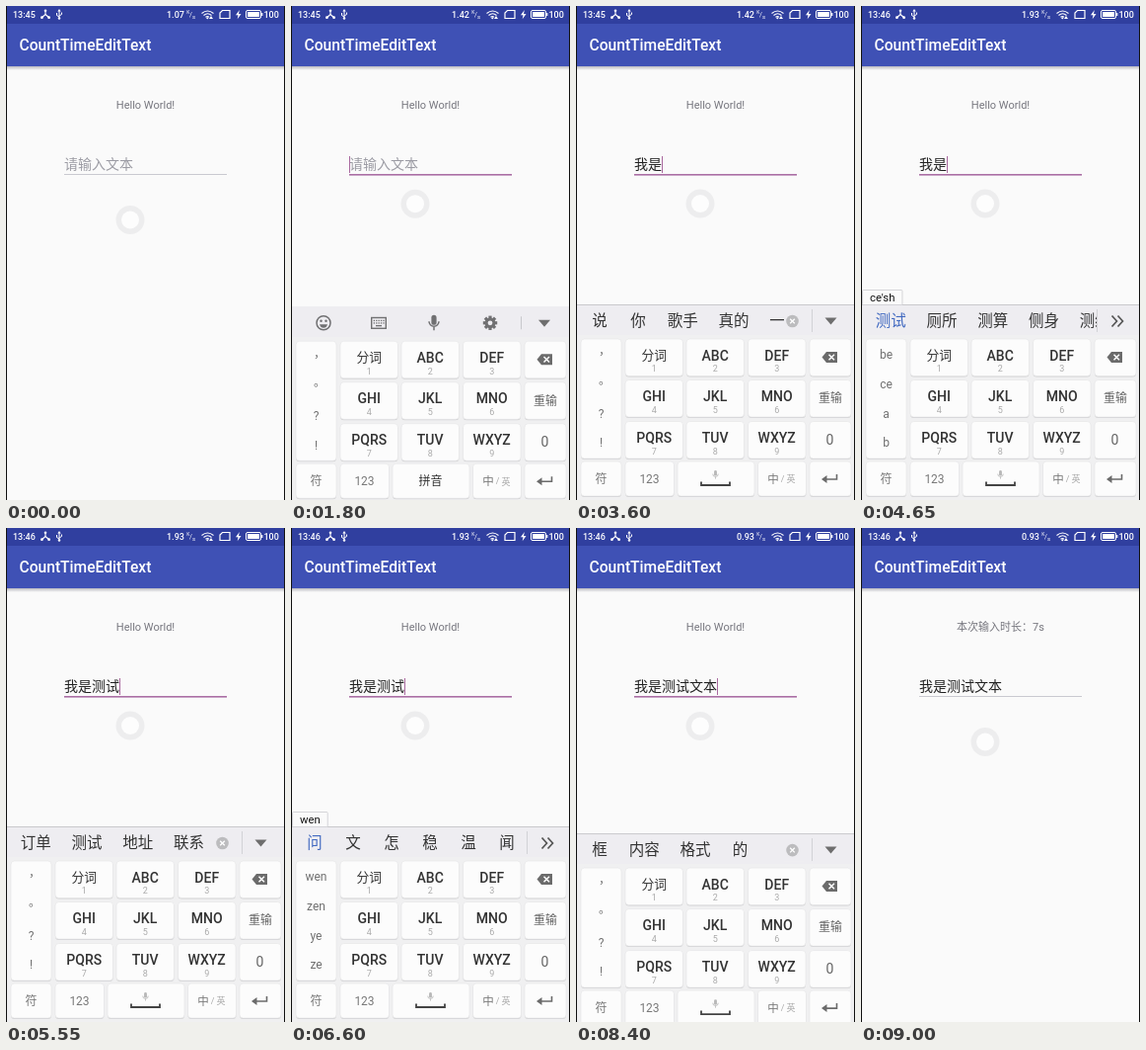
An HTML page that plays this animation: 283x500 px, repeating every 9450 ms.

```html
<!DOCTYPE html>
<html lang="zh-CN">
<head>
<meta charset="utf-8">
<title>CountTimeEditText</title>
<style>
html, body { margin: 0; width: 100%; height: 100%; overflow: hidden; background: #fafafa; }
svg { display: block; width: 283px; height: 500px; font-family: Roboto, "Noto Sans CJK SC", sans-serif; }
text { white-space: pre; }
</style>
</head>
<body>
<svg id="stage" viewBox="0 0 283 500"></svg>
<script>
const LOOP = 9450, STEP = 150, KB_HEIGHT = 198;
const $ = id => document.getElementById(id);

// Text placed by its vertical centre
const txt = (s, x, cy, size, fill, anchor = 'middle', weight = 400, id = '') =>
  `<text ${id && `id="${id}"`} x="${x}" y="${cy + size * .36}" font-size="${size}" fill="${fill}" text-anchor="${anchor}" font-weight="${weight}">${s}</text>`;
const rect = (x, y, w, h, fill, extra = '') =>
  `<rect x="${x}" y="${y}" width="${w}" height="${h}" fill="${fill}" ${extra}/>`;
const line = (d, color, width = 1, extra = '') =>
  `<path d="${d}" fill="none" stroke="${color}" stroke-width="${width}" ${extra}/>`;
const shape = (d, fill) => `<path d="${d}" fill="${fill}"/>`;
const dot = (x, y, r, fill) => `<circle cx="${x}" cy="${y}" r="${r}" fill="${fill}"/>`;
const key = (x, y, w, h) =>
  rect(x, y + 1, w, h, '#d3d3d5', 'rx="3.5"') + rect(x, y, w, h, '#fcfcfc', 'rx="3.5" stroke="#e4e4e6" stroke-width=".6"');
const mic = (x, y, k, fill) => `<g transform="translate(${x} ${y}) scale(${k})">` +
  rect(-2.6, -8, 5.2, 10, fill, 'rx="2.6"') + line('M-5-1.500a5 5 0 0 0 10 0M0 3.500V7.500', fill, 1.5) + '</g>';
const triangle = x => shape(`M${x - 6} 315.500h12l-6 7z`, '#6e6e6e');

function statusBar() {
  const w = '#fff';
  return rect(0, 0, 283, 18, '#303f9f') +
    txt('13:45', 7, 8.7, 9, w, 'start', 500, 'clock') +
    line('M40 4V8.500L36 12M40 8.500L44 12', w, 1.1) + dot(40, 4.8, 1.3, w) + dot(36.4, 11.7, 1.4, w) + dot(43.600, 11.7, 1.4, w) +
    line('M54 4V13M51.500 7V9.500L54 11M56.500 6.500V8.500L54 10', w) + shape('M52.300 5.500L54 3L55.700 5.500z', w) + dot(54, 12.5, 1.2, w) +
    txt('1.07', 163, 8.7, 9, w, 'start', 500, 'speed') +
    txt('K', 184.7, 6.4, 5, w) + txt('/', 187.5, 8.5, 7, w) + txt('s', 190.6, 10.5, 6, w) +
    line('M198.500 7.500Q204.500 2.500 210.500 7.500M200.500 9.500Q204.500 6 208.500 9.500M202.500 11.300Q204.500 9.700 206 11.300', w, 1.1) +
    dot(204.300, 12.2, 1, w) + shape('M208 10l2 3h-4z', w) +
    line('M219.500 4.500H227V12.500H217V7z', w, 1.2) +
    shape('M236.800 4L233 9.300H235.500L234.700 13.300L238.500 8H236z', w) +
    rect(243.500, 4.5, 15, 8, 'none', 'rx="1.5" stroke="#fff"') + rect(245, 6, 12, 5, w) + rect(259.200, 7, 1.2, 3, w) +
    txt('100', 261.5, 8.7, 9, w, 'start', 500);
}

function page() {
  return rect(0, 0, 283, 500, '#fafafa') + rect(0, 61, 283, 4, 'url(#shade)') +
    rect(0, 18, 283, 43, '#3f51b5') +
    txt('CountTimeEditText', 13.5, 39.7, 15.6, '#fff', 'start', 500) +
    statusBar() +
    txt('', 141.5, 100, 11, '#76767e', 'middle', 400, 'label') +
    txt('', 59, 160, 14, '#222', 'start', 400, 'input') +
    rect(59, 170, 165, 1, '#c9c9d0', 'id="underline"') +
    rect(59, 152, 1, 17, '#a9699f', 'id="caret"') +
    `<g id="ring">${dot(0, 0, 14.5, '#ededee')}${dot(0, 0, 9, '#fdfdfd')}</g>`;
}

function toolIcons() {
  const c = '#707072', teeth = [0, 45, 90, 135].map(a =>
    rect(-1.6, -7.2, 3.2, 14.4, c, `transform="rotate(${a})"`)).join('');
  const dots = [0, 1, 2, 3, 4].map(i => rect(83.700 + i * 2.4, 315.5, 1.3, 1.3, c) + rect(83.700 + i * 2.4, 318, 1.3, 1.3, c)).join('');
  return `<g id="tools">` +
    `<circle cx="33" cy="318.500" r="7" fill="none" stroke="${c}" stroke-width="1.500"/>` +
    dot(30.500, 316.5, 1.2, c) + dot(35.500, 316.5, 1.2, c) + shape('M29 320H37Q36 323.500 33 323.500T29 320z', c) +
    rect(81.700, 313.2, 14.6, 10.8, 'none', `stroke="${c}" stroke-width="1.400"`) + dots + rect(86, 320.7, 6, 1.3, c) +
    mic(145, 318.5, 1, c) +
    `<g transform="translate(202 318.500)">${teeth}${dot(0, 0, 5.4, c)}${dot(0, 0, 2.4, '#eeedf1')}</g>` +
    line('M233.500 312V325', '#c8c8cc') + triangle(257) + '</g>';
}

function keyboard() {
  const cols = [50, 112, 174.5], rows = [337, 378.5, 420.5], grey = '#777';
  const names = ['分词', 'ABC', 'DEF', 'GHI', 'JKL', 'MNO', 'PQRS', 'TUV', 'WXYZ'];
  let s = rect(0, 302, 283, 198, '#f0f0f1') + rect(0, 302, 283, 31, '#eeedf1') +
    key(5, 337, 41, 121) + '<g id="side"></g>';
  names.forEach((n, i) => {
    const x = cols[i % 3], y = rows[i / 3 | 0];
    s += key(x, y, 58.5, 37.5) +
      txt(n, x + 29.2, y + 16.5, i ? 14 : 12.8, '#333', 'middle', 500) +
      txt(i + 1, x + 29.2, y + 30, 9, '#aaa');
  });
  rows.forEach(y => s += key(237, y, 42, 37.5));
  [[5, 41], [50, 49.5], [103, 78], [184.5, 49], [237, 42]].forEach(([x, w]) => s += key(x, 461, w, 35));
  return s +
    shape('M249.500 355.500L254 350H265V361H254z', '#6b6b6b') + line('M256.500 352.700l5.500 5.500m0-5.500l-5.500 5.500', '#fff', 1.5) +
    txt('重输', 258, 397, 12, '#666') + txt('0', 257.5, 438.5, 14, '#666') +
    line('M264.500 474V479H251.500', '#6b6b6b', 1.6) + shape('M249 479L254.500 475V483z', '#6b6b6b') +
    txt('符', 25.5, 478.5, 12, grey) + txt('123', 74.5, 478.5, 12, grey) +
    txt('中', 200, 478.5, 11.5, grey) + txt('/', 209.5, 478.5, 9, '#aaa') + txt('英', 218, 479, 9, '#aaa') +
    txt('拼音', 141.5, 478.5, 12, '#333', 'middle', 500, 'spaceName') +
    `<g id="spaceIcon">${mic(141.500, 474.5, .55, '#b8b8b8')}${line('M127 481.500V485H156V481.500', '#444', 1.8)}</g>` +
    toolIcons() +
    `<g id="bar">${rect(0, 302, 283, 1, '#c9c9cc')}<g id="cands" clip-path="url(#strip)"></g>${line('M239.500 307V330', '#d2d2d6')}</g>` +
    `<g id="more">${line('M254.500 313.500l5 5.500l-5 5.500M260.500 313.500l5 5.500l-5 5.500', '#555', 1.7)}</g>` +
    `<g id="predict">${rect(211, 308, 20, 22, '#eeedf1')}${dot(219.500, 319, 6.3, '#bcbcbe')}${line('M217.200 316.700l4.600 4.600m0-4.600l-4.600 4.600', '#fff', 1.3)}${triangle(258.500)}</g>` +
    `<g id="popup">${rect(1.500, 287.5, 30, 15, '#fafafa', 'id="popupBox" rx="1" stroke="#d4d4d8"')}${txt('', 9, 295, 11.3, '#111', 'start', 400, 'pinyin')}</g>`;
}

$('stage').innerHTML = `<defs>
  <linearGradient id="shade" x2="0" y2="1"><stop stop-color="#b9b9c0"/><stop offset="1" stop-color="#fafafa"/></linearGradient>
  <clipPath id="strip"><rect x="0" y="303" width="239" height="30"/></clipPath></defs>` +
  page() + `<g id="kb">${keyboard()}</g>` + rect(0, 0, 1, 500, '#111') + rect(282, 0, 1, 500, '#111');

// [start, committed text, pinyin being typed, candidates, side column]
const marks = '， 。 ? !';
const states = [
  [0, '', '', '', marks],
  [2250, '', 'w', '我 在 这 中 要 找', 'w x y z'],
  [2400, '', 'wo', '我 有 走 握 窝 又', 'wo yo w x'],
  [2700, '', "wo's", '我是 我去 我说 我怕 我让', 'wo yo w x'],
  [2850, '', "wo'sh", '我是 我说 我去 我上 我让', 'wo yo w x'],
  [3000, '', "wo'shi", '我是 我市 我试 卧室 我使', 'wo yo w x'],
  [3450, '我是', '', '说 你 歌手 真的 一个', marks],
  [4050, '我是', 'c', '不 吧 才 从 把 次', 'a b c 2'],
  [4200, '我是', 'ce', '测 策 册 侧 厕 被', 'be ce a b'],
  [4500, '我是', "ce's", '测试 策略 厕所 测算 侧身', 'be ce a b'],
  [4650, '我是', "ce'sh", '测试 厕所 测算 侧身 测绘', 'be ce a b'],
  [4800, '我是', "ce'shi", '测试 侧室 策士 测时 侧视', 'be ce a b'],
  [5400, '我是测试', '', '订单 测试 地址 联系', marks],
  [6000, '我是测试', 'w', '我 在 这 中 要 找', 'w x y z'],
  [6150, '我是测试', 'ye', '也 页 夜 业 野 叶', 'ye ze w x'],
  [6450, '我是测试', 'wen', '问 文 怎 稳 温 闻', 'wen zen ye ze'],
  [6900, '我是测试', "wen'b", '文本 问 文 怎 稳 温', 'wen zen ye ze'],
  [7050, '我是测试', "wen'be", '文本 问 文 怎 稳 温', 'wen zen ye ze'],
  [7200, '我是测试', "wen'ben", '文本 问 文 怎 稳 温', 'wen zen ye ze'],
  [7950, '我是测试文本', '', '框 内容 格式 的', marks]
];

const show = (id, on) => $(id).setAttribute('visibility', on ? 'visible' : 'hidden');
const set = (id, attrs) => { for (const k in attrs) $(id).setAttribute(k, attrs[k]); };
const clamp = v => Math.max(0, Math.min(1, v));
const latest = (list, t) => list.filter(([at]) => at <= t).pop();

function candidates(list, typing) {
  let x = 4.5;
  return list.split(' ').map((c, i) => {
    const w = c.length > 1 ? 51.7 : 39;
    x += w;
    return txt(c, x - w / 2, 318.7, 15.5, typing && !i ? '#4169c0' : '#333');
  }).join('');
}

function sideColumn(list) {
  return list.split(' ').map((c, i) => {
    const wide = '，。'.includes(c);
    return txt(c, wide ? 29 : 25.5, 353 + i * 29.7 - (wide ? 4 : 0), 12, '#707070');
  }).join('');
}

function draw(t) {
  const [at, text, pinyin, list, side] = latest(states, t);
  const focus = t >= 1350 && t < 8550, started = at > 0, typing = pinyin !== '';

  $('clock').textContent = t < 4500 ? '13:45' : '13:46';
  $('speed').textContent = latest([[0, '1.07'], [1350, '1.42'], [4350, '1.93'], [6900, '0.93']], t)[1];
  $('label').textContent = t < 8550 ? 'Hello World!' : '本次输入时长：7s';
  $('input').textContent = text || '请输入文本';
  set('input', { fill: text ? '#222' : '#9c9ca4' });
  set('underline', { fill: focus ? '#aa6ea4' : '#c9c9d0', height: focus ? 1.6 : 1 });
  set('caret', { x: 59 + text.length * 14 });
  show('caret', focus);

  // Keyboard slides in with deceleration, out with acceleration
  const hidden = Math.max((1 - clamp((t - 1560) / 310)) ** 3, clamp((t - 8330) / 370) ** 2);
  set('kb', { transform: `translate(0 ${hidden * KB_HEIGHT})` });
  show('kb', hidden < 1);
  set('ring', { transform: `translate(126 ${200 + 16.5 * hidden})` });
  if (hidden === 1) {
    ['spaceName', 'spaceIcon', 'tools', 'bar', 'more', 'predict', 'popup'].forEach(id => show(id, false));
    return;
  }

  show('spaceName', !started);
  show('spaceIcon', started);
  show('tools', !started);
  show('bar', started);
  show('more', typing);
  show('predict', started && !typing);
  show('popup', typing);
  $('cands').innerHTML = candidates(list, typing);
  $('side').innerHTML = sideColumn(side);
  $('pinyin').textContent = pinyin;
  if (typing) set('popupBox', { width: $('pinyin').getComputedTextLength() + 15 });
}

let last = -1;
function tick() {
  const t = Math.floor(performance.now() % LOOP / STEP) * STEP;
  if (t !== last) draw(last = t);
  requestAnimationFrame(tick);
}
tick();
</script>
</body>
</html>
```
